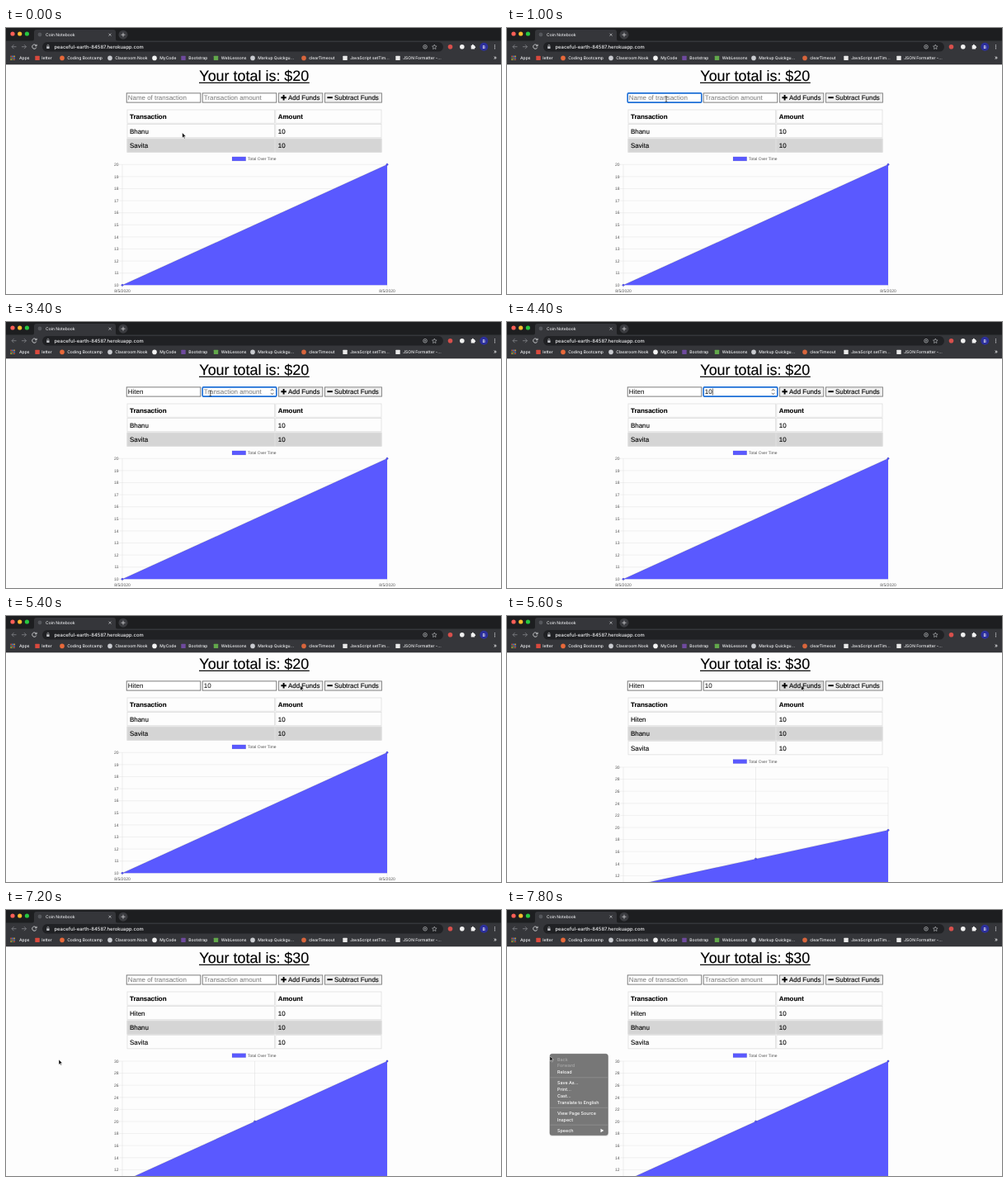
Animation of 600 by 322 pixels, one loop 8 s. Source, as an HTML page:

```html
<!DOCTYPE html>
<html lang="en">
<head>
<meta charset="utf-8">
<title>Coin Notebook</title>
<style>
  html, body { margin: 0; width: 100%; height: 100%; overflow: hidden; background: #fdfdfd; }
  svg { display: block; width: 100vw; height: 100vh; }
  text { white-space: pre; text-rendering: geometricPrecision; }
  .ui { font-family: Inter, Roboto, sans-serif; font-weight: 500; }
  .page { font-family: "Liberation Sans", Arial, sans-serif; }
</style>
</head>
<body>
<svg id="stage" viewBox="0 0 600 322"></svg>
<script>
const LOOP = 8000, STEP = 200;
const BLUE = '#5a59ff', PAPER = '#fdfdfd';
const stage = document.getElementById('stage');

function add(parent, tag, attrs, content) {
  const node = document.createElementNS('http://www.w3.org/2000/svg', tag);
  for (const key in attrs) node.setAttribute(key, attrs[key]);
  if (content !== undefined) node.textContent = content;
  return parent.appendChild(node);
}
const group = (parent = stage) => add(parent, 'g', {});
const rect = (p, x, y, width, height, fill, more) => add(p, 'rect', { x, y, width, height, fill, ...more });
const dot = (p, cx, cy, r, fill, more) => add(p, 'circle', { cx, cy, r, fill, ...more });
const path = (p, d, stroke, width = 1, more) =>
  add(p, 'path', { d, fill: 'none', stroke, 'stroke-width': width, ...more });
const label = (p, x, y, size, fill, content, more) =>
  add(p, 'text', { x, y, 'font-size': size, fill, ...more }, content);
const inked = { stroke: '#000', 'stroke-width': 0.12 };
const show = (node, on) => node.setAttribute('visibility', on ? 'visible' : 'hidden');

function buildBrowser() {
  const g = add(stage, 'g', { class: 'ui' });
  rect(g, 0, 0, 600, 16, '#1d1e20');
  rect(g, 0, 15.5, 600, 28.8, '#35363a');
  path(g, 'M31 16Q34 16 34 13V5Q34 2 37 2H130Q133 2 133 5V13Q133 16 136 16Z', 'none', 0, { fill: '#35363a' });
  ['#ff5f57', '#febc2e', '#28c840'].forEach((c, i) => dot(g, 8 + i * 8.7, 7, 2.6, c));
  dot(g, 41, 8, 2.4, '#55575c');
  label(g, 48, 9.9, 5, '#e6e7ea', 'Coin Notebook');
  path(g, 'M124.5 6.7l3 3m0 -3l-3 3', '#d0d1d4', 0.7);
  dot(g, 142, 8.2, 5.5, '#3a3b3f');
  path(g, 'M139.5 8.2h5m-2.5 -2.5v5', '#d0d1d4', 0.8);

  path(g, 'M12.5 22.7H7m2.5 -2.5l-2.5 2.5 2.5 2.5', '#85878b', 0.8);
  path(g, 'M19 22.7h5.5m-2.5 -2.5l2.5 2.5 -2.5 2.5', '#85878b', 0.8);
  path(g, 'M36.6 21.3a2.6 2.6 0 1 0 .2 2.2M37.1 19.8v2h-2', '#e6e7ea', 0.8);
  rect(g, 44, 17, 486, 11.6, '#202124', { rx: 5.8 });
  rect(g, 49.2, 22.2, 3.4, 2.8, '#c2c4c8', { rx: 0.4 });
  path(g, 'M49.9 22.2v-1a1 1 0 0 1 2 0v1', '#c2c4c8', 0.6);
  label(g, 58.4, 24.8, 5.9, '#f0f1f3', 'peaceful-earth-84587.herokuapp.com');
  dot(g, 508, 22.8, 2.3, 'none', { stroke: '#c2c4c8', 'stroke-width': 0.7 });
  dot(g, 508, 22.8, 0.8, '#c2c4c8');
  path(g, 'M519.3 20l.8 1.9 2 .2 -1.5 1.4 .4 2 -1.7 -1 -1.7 1 .4 -2 -1.5 -1.4 2 -.2z', '#c2c4c8', 0.6);
  dot(g, 538.5, 22.8, 2.8, '#d8504c');
  dot(g, 552.8, 22.8, 2.8, '#f1f1f1');
  rect(g, 563.7, 21, 4.4, 4.4, '#f1f1f1', { rx: 0.5 });
  dot(g, 565.8, 20.8, 1, '#f1f1f1');
  dot(g, 568.2, 23.2, 1, '#f1f1f1');
  dot(g, 579.3, 22.8, 5, '#2c2f9b');
  label(g, 579.3, 24.7, 5.2, '#fff', 'B', { 'text-anchor': 'middle' });
  for (let i = -1; i < 2; i++) dot(g, 592.5, 22.8 + i * 2, 0.65, '#e6e7ea');

  const appColors = ['#e8584a', '#4f8df5', '#f4bd3b', '#54ad62'];
  for (let i = 0; i < 9; i++)
    rect(g, 5.4 + (i % 3) * 2, 33.6 + Math.floor(i / 3) * 2, 1.4, 1.4, appColors[i % 4]);
  label(g, 16, 38.2, 5, '#f0f1f3', 'Apps');
  const bookmarks = [
    [38, 'letter', '#d9493d'], [68, 'Coding Bootcamp', '#e8693a'],
    [126, 'Classroom Nook', '#c9cbd0'], [180, 'MyCode', '#f3f3f3'],
    [215, 'Bootstrap', '#6f4a9e'], [254.5, 'WebLessons', '#62a84b'],
    [299, 'Markup Quickgu...', '#c9cbd0'], [361, 'clearTimeout', '#d8653c'],
    [411, 'JavaScript setTim...', '#e9e9e9'], [475, 'JSON Formatter -...', '#e9e9e9']
  ];
  bookmarks.forEach(([x, name, color], i) => {
    if (i === 0 || i === 4 || i === 5 || i > 7) rect(g, x - 2.7, 33.7, 5.4, 5.4, color, { rx: 0.6 });
    else dot(g, x, 36.4, 2.8, color);
    label(g, x + (i ? 6.2 : 5.2), 38.2, 5, '#f0f1f3', name);
  });
  label(g, 591, 38.4, 6.5, '#f0f1f3', '»');
}

function buildField(parent, x, placeholder) {
  const g = group(parent);
  const box = rect(g, x, 78.9, 89.6, 11.2, '#fff');
  const text = label(g, x + 1.6, 87, 7.95, '#000', '');
  const caret = rect(g, 0, 80.5, 0.6, 8, '#000');
  return (value, focused) => {
    box.setAttribute('stroke', focused ? '#1d6fd6' : '#6f6f6f');
    box.setAttribute('stroke-width', focused ? 1.6 : 0.9);
    box.setAttribute('rx', focused ? 1.2 : 0);
    text.textContent = value || placeholder;
    text.setAttribute('fill', value ? '#000' : '#757575');
    show(caret, focused && value);
    if (value) caret.setAttribute('x', x + 1.9 + text.getComputedTextLength());
  };
}

function buildButton(parent, x, width, name, isPlus) {
  const box = rect(parent, x, 78.9, width, 11.2, '#efefef', { stroke: '#7c7c7c', 'stroke-width': 0.9 });
  path(parent, `M${x + 3} 84.2h6.4` + (isPlus ? 'm-3.2 -3.2v6.4' : ''), '#000', 1.9);
  label(parent, x + 11.6, 87, 7.95, '#000', name, inked);
  return box;
}

function buildTable(parent, names) {
  const rows = [['Transaction', 'Amount'], ...names.map(name => [name, '10'])];
  rows.forEach((cells, i) => {
    const y = 99 + i * 17.55;
    const fill = i === 2 ? '#d5d5d5' : PAPER;
    if (i === 2) rect(parent, 146.5, y - 0.4, 309, 16.8, fill);
    cells.forEach((cell, col) => {
      const x = col ? 326.8 : 147;
      rect(parent, x, y, col ? 128.2 : 178.4, 16.2, fill, { stroke: '#dedede', 'stroke-width': 0.8 });
      label(parent, x + 3, y + 11, 7.95, '#000', cell, { ...inked, 'font-weight': i ? 400 : 700 });
    });
  });
}

// Returns a setter for how far the points have risen from the base (0 to 1).
function buildChart(parent, top, max, unit, columns) {
  const left = 141, width = 321, height = 146, base = top + height;
  const xAt = i => left + width * i / columns;
  const middle = { 'text-anchor': 'middle' };
  const shade = 'rgba(0,0,0,0.1)';
  rect(parent, 274, top - 9.4, 16.7, 5, BLUE, { stroke: shade, 'stroke-width': 0.6 });
  label(parent, 293, top - 5.2, 4.95, '#555', 'Total Over Time');
  for (let i = 0; i <= 10; i++) {
    const y = top + height * i / 10;
    path(parent, `M137 ${y}H${left + width}`, '#e3e3e3', 0.5);
    label(parent, 136.6, y + 1.7, 5, '#555', max - i * unit, { 'text-anchor': 'end' });
  }
  for (let i = 0; i <= columns; i++) {
    path(parent, `M${xAt(i)} ${top}V${base + 4}`, '#dcdcdc', 0.5);
    label(parent, xAt(i), base + 9, 5, '#555', '8/5/2020', middle);
  }
  const area = path(parent, '', 'none', 0, { fill: BLUE });
  const line = path(parent, '', shade, 1.25);
  const points = Array.from({ length: columns + 1 }, (_, i) =>
    dot(parent, xAt(i), base, 1.25, BLUE, { stroke: 'rgba(0,0,0,0.25)', 'stroke-width': 0.5 }));
  return rise => {
    const slope = `M${left} ${base}L${left + width} ${base - height * rise}`;
    points.forEach((p, i) => p.setAttribute('cy', base - height * rise * i / columns));
    line.setAttribute('d', slope);
    area.setAttribute('d', `${slope}V${base}Z`);
  };
}

function buildMenu() {
  const g = add(stage, 'g', { class: 'ui' });
  rect(g, 51.5, 175.2, 71.5, 98.8, '#000', { rx: 3, opacity: 0.12 });
  rect(g, 52, 174.3, 70.3, 98.2, '#777', { rx: 2.5, stroke: '#606060', 'stroke-width': 0.5 });
  const items = ['Back', 'Forward', 'Reload', '', 'Save As...', 'Print...', 'Cast...',
    'Translate to English', '', 'View Page Source', 'Inspect', '', 'Speech'];
  let y = 182.6;
  items.forEach((item, i) => {
    if (item) {
      label(g, 61, y, 5.4, i < 2 ? '#a9a9a9' : '#fff', item);
      y += 7.8;
    } else {
      path(g, `M52.3 ${y - 3.2}H122`, '#949494', 0.7);
      y += 5.3;
    }
  });
  path(g, 'M113.5 264.8l3.8 2.2 -3.8 2.2z', 'none', 0, { fill: '#fff' });
  return g;
}

buildBrowser();
const page = add(stage, 'g', { class: 'page' });
const total = label(page, 300.8, 64.1, 17.95, '#000', '', { ...inked, 'text-anchor': 'middle' });
rect(page, 234, 65.7, 133.8, 1.2, '#000');
const setName = buildField(page, 146.2, 'Name of transaction');
const setAmount = buildField(page, 238.2, 'Transaction amount');
const spinner = group(page);
path(spinner, 'M321 83.2l1.6 -1.9 1.6 1.9M321 85.8l1.6 1.9 1.6 -1.9', '#555', 0.9);
const addButton = buildButton(page, 330.4, 53.4, 'Add Funds', true);
buildButton(page, 386.4, 69, 'Subtract Funds', false);

const before = group(page), after = group(page);
buildTable(before, ['Bhanu', 'Savita']);
buildChart(before, 165.3, 20, 1, 1)(1);
buildTable(after, ['Hiten', 'Bhanu', 'Savita']);
const setRise = buildChart(after, 183, 30, 2, 2);
const menu = buildMenu();

const pointers = {
  arrow: path(stage, 'M0 0V6.2L1.5 4.9 2.5 7.1 3.4 6.7 2.4 4.5H4.3Z', '#fff', 0.5, { fill: '#000' }),
  beam: path(stage, 'M-1.3 -3.4Q0 -3.4 0 -2.6Q0 -3.4 1.3 -3.4M0 -2.8V2.8M-1.3 3.4Q0 3.4 0 2.6Q0 3.4 1.3 3.4', '#222', 0.7)
};

// Start time, pointer kind, x, y
const moves = [
  [0, 'arrow', 213.7, 126.8], [200, 'arrow', 212, 121], [400, 'arrow', 206, 108],
  [600, 'arrow', 198, 95], [800, 'beam', 193, 86], [1600],
  [2800, 'beam', 198, 87], [3000, 'beam', 213, 87], [3200, 'beam', 232, 86],
  [3400, 'beam', 247.7, 86.3], [4400],
  [4800, 'beam', 266, 86], [5000, 'beam', 304, 86], [5200, 'arrow', 342, 84],
  [5400, 'arrow', 356.7, 84], [6400, 'arrow', 346, 92], [6600, 'arrow', 290, 124],
  [6800, 'arrow', 180, 166], [7000, 'arrow', 85, 188], [7200, 'arrow', 64, 181],
  [7400, 'arrow', 52, 176.8]
];
const typed = (word, start, t) => word.slice(0, Math.max(0, Math.floor((t - start) / STEP) + 1));
const between = (t, a, b) => t >= a && t < b;
const CLICK = 5600, CLEAR = 6400;

function render(t) {
  const added = t >= CLICK, cleared = t >= CLEAR;
  const amountFocused = between(t, 3400, 5400);
  total.textContent = `Your total is: $${added ? 30 : 20}`;
  setName(cleared ? '' : typed('Hiten', 1600, t), between(t, 1000, 3400));
  setAmount(cleared ? '' : typed('10', 4000, t), amountFocused);
  show(spinner, amountFocused);
  addButton.setAttribute('fill', between(t, CLICK, CLEAR) ? '#dadada' : '#efefef');

  show(before, !added);
  show(after, added);
  const progress = Math.min(1, Math.max(0, (t - CLICK + 150) / 1000));
  setRise(1 - (1 - progress) ** 4);
  show(menu, t >= 7600);

  const [, kind, x, y] = moves.findLast(move => move[0] <= t);
  for (const key in pointers) show(pointers[key], key === kind);
  if (kind) pointers[kind].setAttribute('transform', `translate(${x} ${y})`);
}

const origin = performance.now();
function tick() {
  const t = (performance.now() - origin) % LOOP;
  render(Math.floor(t / STEP) * STEP);
  requestAnimationFrame(tick);
}
tick();
</script>
</body>
</html>
```
